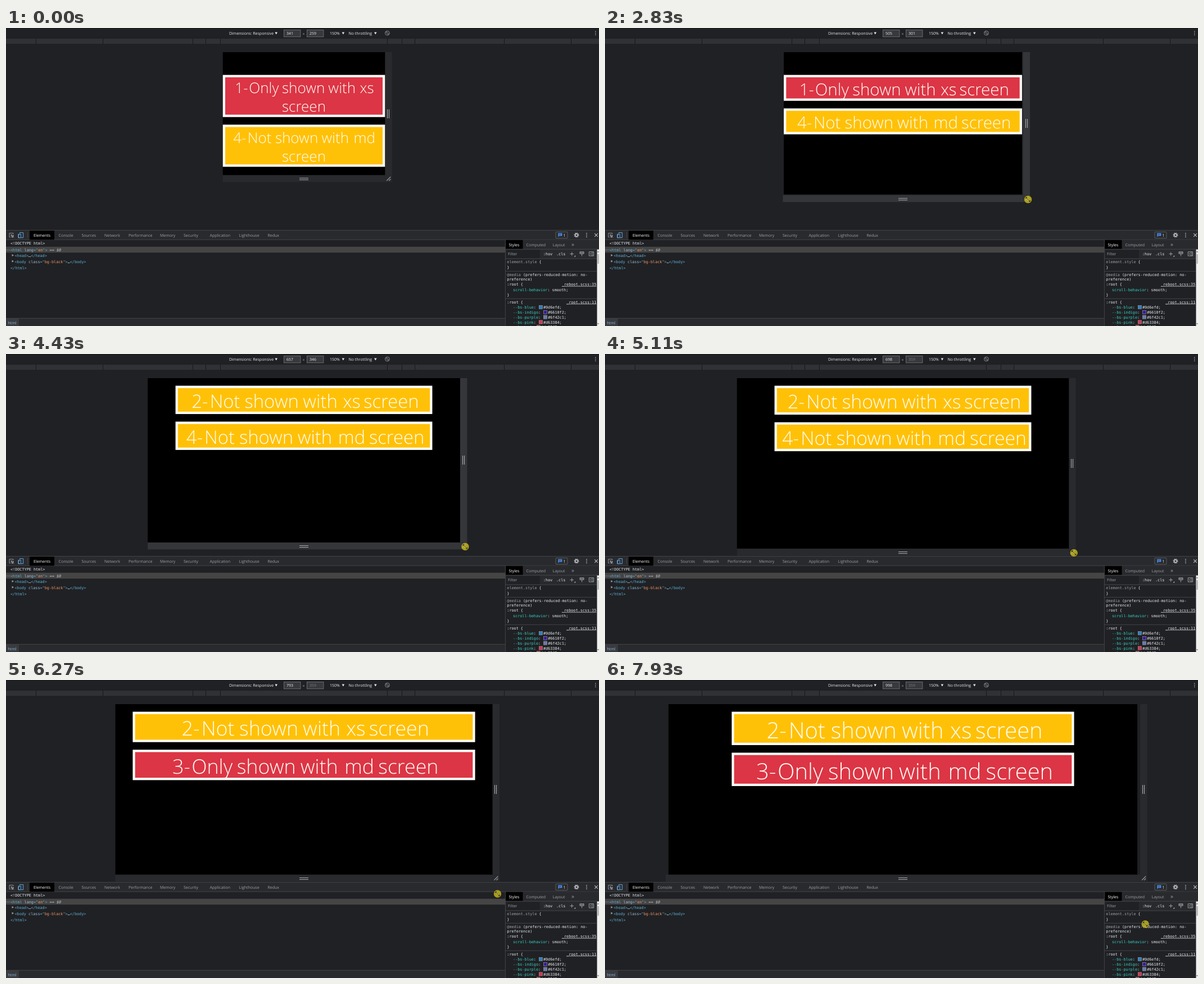
Write an HTML page that moves like this. It is 1055 by 531 pixels and loops after 8 s.

```html
<!DOCTYPE html>
<html lang="en">
<head>
<meta charset="utf-8">
<title>Responsive preview</title>
<style>
html, body { margin: 0; width: 100%; height: 100%; overflow: hidden; background: #202124; }
svg { display: block; width: 1055px; height: 531px; }
text { font: 7px "Open Sans", "Noto Sans", sans-serif; fill: #e8eaed; white-space: pre; text-rendering: geometricPrecision; }
.tab { fill: #9aa0a6; }
.on { fill: #fff; }
.code text { font: 6.8px "DejaVu Sans Mono", "Noto Sans Mono", monospace; }
.tag { fill: #5db0d7; }
.attr { fill: #9bbbdc; }
.val { fill: #f29766; }
.prop { fill: #35d4c7; }
.dim { fill: #9aa0a6; }
.link { text-decoration: underline; }
.big { font-weight: 300; fill: #fffdf6; text-anchor: middle; }
.line { fill: none; stroke: #9aa0a6; }
.rule { fill: none; stroke: #494c50; stroke-width: .8; }
.field { fill: #38393c; stroke: #77797c; stroke-width: .8; }
</style>
</head>
<body>
<svg viewBox="0 0 1055 531">
  <rect width="1055" height="531" fill="#202124"/>

  <!-- device toolbar -->
  <path d="M0 .4H1055" stroke="#111214" stroke-width=".8"/>
  <text x="397" y="12.3">Dimensions: Responsive</text>
  <rect class="field" x="494.4" y="3.4" width="29.5" height="12.4"/>
  <rect class="field" x="535.4" y="3.4" width="29.5" height="12.4"/>
  <text id="wide" x="499" y="12.3"></text>
  <text class="dim" x="527.6" y="12.6">×</text>
  <text id="high" x="540" y="12.3"></text>
  <text x="576" y="12.3">150%</text>
  <text x="609.5" y="12.3">No throttling</text>
  <path fill="#e8eaed" d="M478.4 7.6h4.6l-2.3 4zM597.6 7.6h4.6l-2.3 4zM655 7.6h4.6l-2.3 4z"/>
  <g class="line" stroke-width=".8">
    <circle cx="678.4" cy="9" r="3.9"/>
    <path d="M675.9 7.6l1.4-1.2 3.7 4-1.4 1.3z"/>
  </g>
  <path fill="#9aa0a6" d="M1048 5.4h1.5v1.5h-1.5zM1048 8.4h1.5v1.5h-1.5zM1048 11.4h1.5v1.5h-1.5z"/>
  <rect y="18" width="1055" height="11" fill="#303134"/>
  <path d="M0 18.4H1055M0 28.8H1055" stroke="#1b1c1e" stroke-width=".8"/>
  <path id="ticks" stroke="#17181a" stroke-width="1"/>

  <!-- device frame -->
  <rect id="barR" y="43"/>
  <rect id="barB"/>
  <rect id="corner"/>
  <path id="grips" fill="none" stroke="#a9abae" stroke-width="1.1"/>
  <rect id="page" y="43"/>
  <g id="boxes"></g>

  <!-- tools panel -->
  <rect y="360" width="1055" height="17.3" fill="#292a2d"/>
  <path class="rule" d="M0 360.4H1055M0 377.2H1055M38.5 363.5v11"/>
  <rect x="42" y="361" width="44" height="16.3" fill="#000"/>
  <g id="tabs"></g>
  <g class="line" stroke-width=".9">
    <path d="M8 372.6H6V365.6h7v2"/>
    <path d="M9 368.4l5 2-2.2.8-.8 2.2zM11.5 371l2.4 2.6" stroke="#bdc1c6"/>
    <path d="M24 373.6h-1.8v-5H24M24.5 366V364.6h6.2v9h-4" stroke="#6ab4f0"/>
    <path d="M22 367.2h4.4v6.6H22z" stroke="#6ab4f0"/>
    <rect x="978" y="363.3" width="21" height="11.4" rx="1" stroke="#5f6368"/>
    <circle cx="1015" cy="369" r="2.4" stroke-width="1.6" stroke="#bdc1c6"/>
    <circle cx="1015" cy="369" r="3.9" stroke-width="1.2" stroke-dasharray="1.5 1.56" stroke="#bdc1c6"/>
    <path d="M1047.2 366.2l5.6 5.6m0-5.6l-5.6 5.6" stroke="#bdc1c6" stroke-width="1.1"/>
  </g>
  <path fill="#4a8df0" d="M982.3 365.6h7v5h-5l-2 2z"/>
  <path d="M983.7 367.3h4.2M983.7 369h3" stroke="#202124" stroke-width=".6"/>
  <text x="991.5" y="371.5">1</text>
  <path fill="#bdc1c6" d="M1032.2 365.2h1.5v1.5h-1.5zM1032.2 368.3h1.5v1.5h-1.5zM1032.2 371.4h1.5v1.5h-1.5z"/>

  <!-- element tree -->
  <rect y="389.8" width="888" height="10.4" fill="#454545"/>
  <g class="code">
    <text x="8" y="386.4">&lt;!DOCTYPE html&gt;</text>
    <text x="0" y="396.6" class="dim" style="font-size:4.2px">•••</text>
    <text x="8" y="397.5" class="tag">&lt;html <tspan class="attr">lang</tspan>="<tspan class="val">en</tspan>"&gt;<tspan fill="#c4c7cb"> == <tspan font-style="italic">$0</tspan></tspan></text>
    <text x="15.5" y="408.4" class="tag">&lt;head&gt;<tspan fill="#fff">…</tspan>&lt;/head&gt;</text>
    <text x="15.5" y="419.2" class="tag">&lt;body <tspan class="attr">class</tspan>="<tspan class="val">bg-black</tspan>"&gt;<tspan fill="#fff">…</tspan>&lt;/body&gt;</text>
    <text x="8" y="430" class="tag">&lt;/html&gt;</text>
  </g>
  <path fill="#9aa0a6" d="M10.6 402.9l3.4 2.1-3.4 2.1zM10.6 413.5l3.4 2.1-3.4 2.1z"/>
  <rect y="517" width="888" height="14" fill="#292a2d"/>
  <rect y="517.6" width="23" height="13.4" fill="#393b3f"/>
  <path class="rule" d="M0 517.3H888"/>
  <text x="3.5" y="527.5" style="fill:#8ab9e0">html</text>

  <!-- styles sidebar -->
  <rect x="888.5" y="377.6" width="166.5" height="33.6" fill="#292a2d"/>
  <rect x="889" y="377.8" width="30.5" height="16" fill="#000"/>
  <rect x="890" y="395.5" width="60" height="14.5" fill="#202124"/>
  <path class="rule" d="M888.4 377.5V531M888 394.2H1055M888 411.2H1051M888 433.4H1051M888 482.3H1051"/>
  <text class="on" x="894.5" y="388.6">Styles</text>
  <text class="tab" x="925.5" y="388.6">Computed</text>
  <text class="tab" x="972.5" y="388.6">Layout</text>
  <text class="tab" x="1006" y="388.6" style="font-size:10px">»</text>
  <text class="tab" x="893" y="405.4">Filter</text>
  <g class="code">
    <text x="956" y="405.2" fill="#bdc1c6">:hov</text>
    <text x="979" y="405.2" fill="#bdc1c6">.cls</text>
    <text x="891.3" y="419.3" class="dim">element.style <tspan fill="#e8eaed">{</tspan></text>
    <text x="891.3" y="428.9">}</text>
    <text x="891.3" y="442"><tspan class="dim">@media</tspan> (prefers-reduced-motion: no-</text>
    <text x="891.3" y="450.4">preference)</text>
    <text x="891.3" y="458.9">:root {</text>
    <text x="1050.3" y="458.9" text-anchor="end" class="link">_reboot.scss:35</text>
    <text x="902" y="468.6"><tspan class="prop">scroll-behavior</tspan>: smooth;</text>
    <text x="891.3" y="477.6">}</text>
    <text x="891.3" y="490.6">:root {</text>
    <text x="1050.3" y="490.6" text-anchor="end" class="link">_root.scss:11</text>
    <g id="vars"></g>
  </g>
  <g class="line" stroke="#bdc1c6">
    <path d="M1003.5 402.5h6.4m-3.2-3.2v6.4M1021 398.7h7v3.6h-7zM1024.5 402.3v4.2M1021 400.5h7M1037.3 398.8h8.2v7.2h-8.2zM1043 398.8v7.2M1041.2 400.7l-2 1.7 2 1.7"/>
  </g>
  <path fill="#bdc1c6" d="M1013.2 405v2.6h-2.6z"/>
  <rect x="1051.5" y="394.6" width="3.5" height="136.4" fill="#efefef"/>
  <rect x="1051.7" y="403" width="3.3" height="17" fill="#bdbdbd"/>
  <path fill="#555" d="M1052 399.4l1.4-1.8 1.4 1.8zM1052 526.3l1.4 1.8 1.4-1.8z"/>

  <g id="cursor">
    <circle r="6.7" fill="#c6b81c" opacity=".82"/>
    <g id="sizer" fill="none" stroke="#191805" stroke-width=".9">
      <path d="M-3.4-3.4L3.4 3.4" stroke="#f5f2d0" stroke-width="1.6" opacity=".6"/>
      <path d="M-3.6-1.4v-2.2h2.2M3.6 1.4v2.2h-2.2M-3.6-3.6L3.6 3.6"/>
    </g>
    <path id="arrow" d="M-1-2v7.4l1.8-1.7 1.2 2.8 1.1-.5-1.2-2.7h2.4z" fill="#fff" stroke="#222" stroke-width=".5"/>
  </g>
</svg>
<script>
const NS = 'http://www.w3.org/2000/svg', LOOP = 8000;
const SCALE = .846, MID = 530, TOP = 43, BAR = 12.5, MAX_H = 359;
const $ = id => document.getElementById(id);
const set = (el, attrs) => { for (const k in attrs) el.setAttribute(k, attrs[k]); };
const add = (parent, tag, attrs, text = '') => {
  const el = document.createElementNS(NS, tag);
  set(el, attrs);
  el.textContent = text;
  return parent.appendChild(el);
};
const rect = (el, x, y, width, height, fill) =>
  set(el, { x, y, width: Math.max(0, width), height: Math.max(0, height), fill });

// static lists
set($('ticks'), { d: [53, 172, 332, 355, 381, 678, 704, 727, 886, 1005].map(x => `M${x + .5} 18.5v10`).join('') });
[['Elements', 49], ['Console', 93.5], ['Sources', 134.5], ['Network', 175], ['Performance', 218], ['Memory', 274],
 ['Security', 316], ['Application', 362.5], ['Lighthouse', 414.5], ['Redux', 465.5]]
  .forEach(([name, x], i) => add($('tabs'), 'text', { x, y: 371.5, class: i ? 'tab' : 'on' }, name));
[['blue', '#0d6efd', '#2f7fc1'], ['indigo', '#6610f2', '#3a18a0'], ['purple', '#6f42c1', '#6677b0'],
 ['pink', '#d63384', '#d63352'], ['red', '#dc3545', '#dc3545']].forEach(([name, hex, fill], i) => {
  const y = 500 + i * 8.85, x = 902 + (name.length + 6) * 4.094;
  const label = add($('vars'), 'text', { x: 902, y, class: 'prop' }, '--bs-' + name);
  add(label, 'tspan', { fill: '#e8eaed' }, ':');
  add($('vars'), 'rect', { x: x + 5.4, y: y - 5.6, width: 6, height: 6, fill, stroke: '#a5a8ac', 'stroke-width': .6 });
  add($('vars'), 'text', { x: x + 13, y }, hex + ';');
});

// headings: words sit centred in slots measured in em, trailing space included
const RED = '#dc3545', YELLOW = '#ffc107', SPACE = .27;
const LABELS = {
  1: ['1- Only shown with xs screen', RED],
  2: ['2- Not shown with xs screen', YELLOW],
  3: ['3- Only shown with md screen', RED],
  4: ['4- Not shown with md screen', YELLOW]
};
const SLOTS = { Not: 1.88, Only: 2.2, shown: 2.87, with: 2.07, xs: 1.13, md: 1.68, screen: 2.9 };
const slot = word => SLOTS[word] || .94;
const span = words => words.reduce((sum, word) => sum + slot(word), -SPACE);

const pen = document.createElement('canvas').getContext('2d');
pen.font = '300 100px "Open Sans", "Noto Sans", sans-serif';
const FIT = 1207 / pen.measureText('4-Not shown with md screen').width;

const boxes = [0, 1].map(() => {
  const g = $('boxes');
  return { rim: add(g, 'rect', {}), fill: add(g, 'rect', {}),
    words: Array.from({ length: 6 }, () => add(g, 'text', { class: 'big' })) };
});

function drawBox(box, id, y, width, size) {
  const [label, color] = LABELS[id], rim = 5 * SCALE, words = label.split(' ');
  const wrap = span(words) * size > width - 2 * rim;
  const tall = (wrap ? 2 : 1) * size * 1.2, left = MID - width / 2;
  rect(box.rim, left, y, width, tall + 2 * rim, '#fffdf8');
  rect(box.fill, left + rim, y + rim, width - 2 * rim, tall, color);
  const lines = wrap ? [words.slice(0, -1), words.slice(-1)] : [words];
  let n = 0;
  lines.forEach((line, row) => {
    let x = MID - span(line) * size / 2;
    for (const word of line) {
      const el = box.words[n++], gap = word in SLOTS ? SPACE : 0;
      el.textContent = word;
      el.style.fontSize = size * FIT + 'px';
      set(el, { x: x + (slot(word) - gap) * size / 2, y: y + rim + size * (1.014 + 1.2 * row) });
      x += slot(word) * size;
    }
  });
  return y + tall + 2 * rim;
}

// [time, value] keys
const WIDTH = [[1290, 341], [1728, 377], [2096, 414], [2849, 505], [2925, 516], [3782, 608], [4449, 657], [4596, 668],
  [5416, 716], [5793, 754], [6262, 793], [6951, 856], [7104, 873], [7925, 998]];
const LAG = [[1360, 0], [1728, 11], [2096, 2], [2849, 4], [3782, 2], [4449, 0], [6951, 0], [7925, 12]];
const CURSOR_Y = [[940, 279], [1020, 270], [1290, 270], [1728, 280.5], [2096, 289], [2849, 305.5], [2925, 307.5], [3782, 329],
  [4449, 343.3], [4596, 346.5], [5416, 359], [5793, 369.5], [6262, 381], [6951, 401], [7104, 407], [7925, 435]];

function at(keys, t) {
  if (t <= keys[0][0]) return keys[0][1];
  for (let i = 1; i < keys.length; i++) {
    const [t1, b] = keys[i], [t0, a] = keys[i - 1];
    if (t <= t1) return a + (b - a) * (t - t0) / (t1 - t0);
  }
  return keys[keys.length - 1][1];
}

const STARTS = [120, 940, 1360, 2170, 3000, 3860, 4670, 5480, 6340, 7180, LOOP];
const COUNTS = [12, 5];
function snap(t) {
  if (t < STARTS[0]) return 0;
  const i = STARTS.findIndex(s => s > t) - 1, n = COUNTS[i] || 11;
  const step = (STARTS[i + 1] - STARTS[i]) / n;
  return STARTS[i] + step * Math.min(n - 1, Math.floor((t - STARTS[i]) / step + .35));
}

function cursorAt(t, right) {
  if (t < 940) {
    const p = Math.min(1, (t - 120) / 750), e = 1 - (1 - p) ** 1.7;
    return [1013 - 316 * e, 530 - 246 * e];
  }
  return [right + 9 + 6 * Math.max(0, 1 - (t - 940) / 80), at(CURSOR_Y, t)];
}

function draw(time) {
  const t = snap(time);
  const w = Math.round(at(WIDTH, t)), half = w * SCALE / 2, right = MID + half;
  const [cx, cy] = cursorAt(t, right);
  const free = t < 1360 ? 259 : (cy - TOP - 7.5) / SCALE;
  const h = Math.round(Math.min(MAX_H, Math.max(259, free)));
  const capped = h >= MAX_H, drag = t >= 1360 && !capped;
  const bottom = TOP + h * SCALE;

  $('wide').textContent = w;
  $('high').textContent = h;
  $('high').style.fill = capped ? '#77797c' : '';

  const tone = drag ? '#35363a' : '#292a2d';
  rect($('barR'), right, TOP, BAR, bottom - TOP, tone);
  rect($('barB'), MID - half, bottom, 2 * half, BAR, tone);
  rect($('corner'), right, bottom, BAR, BAR, t >= 940 && !capped ? '#35363a' : tone);
  const gx = Math.round(right + 4) + .5, gy = Math.round(bottom + 5) + .5;
  const my = Math.round((TOP + bottom) / 2);
  set($('grips'), { d:
    `M${gx} ${my - 8}v16m3 0v-16M${MID - 8} ${gy}h16m0 3h-16` +
    `M${right + 3} ${bottom + 10}l7-7m0 4l-3 3` });

  const lag = at(LAG, t), pw = w - lag;
  rect($('page'), MID - pw * SCALE / 2, TOP, pw * SCALE, bottom - TOP - lag * (drag ? .27 : 0), '#000');
  const [ids, wide, gap] = pw < 576 ? [[1, 4], pw, 48] : pw < 768 ? [[2, 4], 540, 16] : [[2, 3], 720, 16];
  const size = (23.6 + .027 * pw) * SCALE;
  let y = TOP + gap * SCALE;
  ids.forEach((id, i) => { y = drawBox(boxes[i], id, y, wide * SCALE, size) + 16 * SCALE; });

  $('cursor').style.display = t < 120 ? 'none' : '';
  $('sizer').style.display = t < 940 ? 'none' : '';
  $('arrow').style.display = t < 940 ? '' : 'none';
  set($('cursor'), { transform: `translate(${cx} ${cy})` });
}

const begin = performance.now();
function tick() {
  draw((performance.now() - begin) % LOOP);
  requestAnimationFrame(tick);
}
tick();
</script>
</body>
</html>
```
